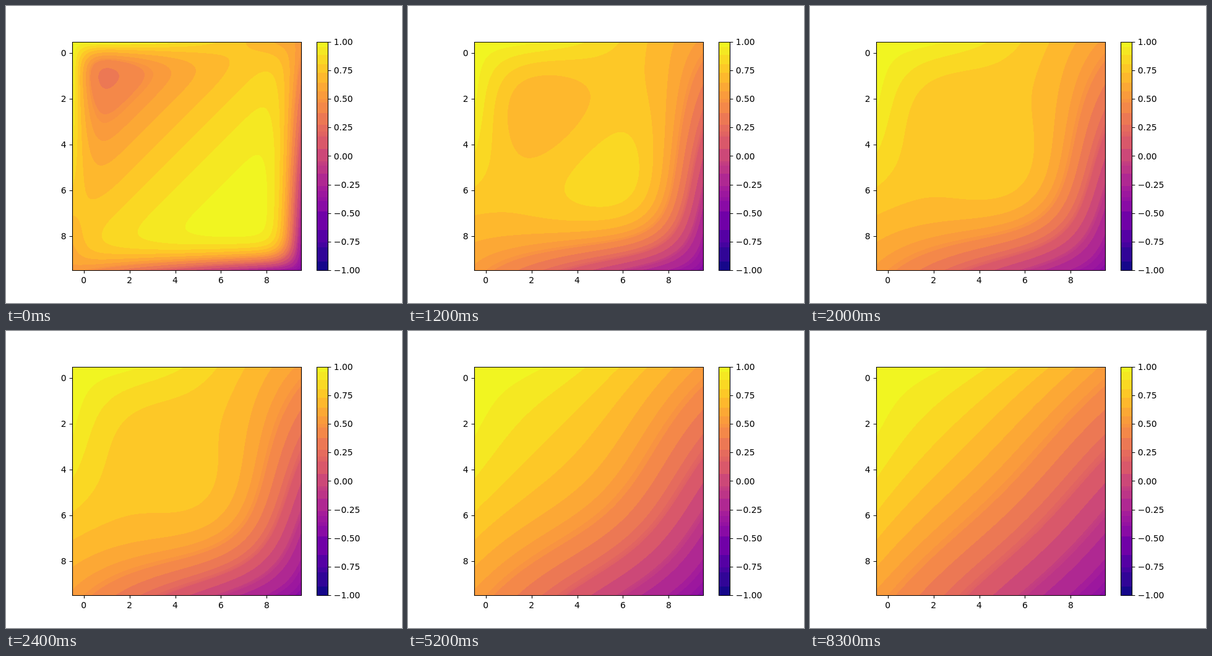
An HTML page with a canvas for the animation above (9 s loop, 640 px wide and 480 px high).

```html
<!DOCTYPE html>
<html lang="en">
<head>
<meta charset="utf-8">
<title>Heat diffusion on a square</title>
<style>
  html, body { margin: 0; width: 640px; height: 480px; overflow: hidden; background: #fff; }
  canvas, svg { position: absolute; left: 0; top: 0; display: block; }
  text { font: 13.889px "DejaVu Sans", Verdana, sans-serif; fill: #000; }
  path { fill: none; stroke: #000; stroke-width: 1.11; }
</style>
</head>
<body>
<canvas id="plot" width="640" height="480"></canvas>
<svg id="axes" width="640" height="480" viewBox="0 0 640 480"></svg>
<script>
const LOOP = 9000, STEP = 100;
const LEFT = 107.2, TOP = 57.6, SIZE = 369.6;   // plot square
const PX = 107, PY = 58, SIDE = 370;            // its pixels
const MODES = 28;
const T0 = 0.0025, DT = 0.0011;                 // diffusion time: first step, per step

// Steps at which the picture is renewed; between them it is held.
const steps = [];
for (let n = 0; n <= 33; n++) if (n !== 11) steps.push(n);
steps.push(37, 41, 46, 52, 60, 70, 83);

// ---- plasma colours, merged into coarse RGB cells ----
const stops = ['0d0887', '46039f', '7201a8', '9c179e', 'bd3786',
               'd8576b', 'ed7953', 'fb9f3a', 'fdca26', 'f0f921']
  .map(h => [0, 2, 4].map(i => parseInt(h.substr(i, 2), 16)));

function stopAt(i, c) {
  const last = stops.length - 1;
  if (i < 0) return 2 * stops[0][c] - stops[1][c];
  if (i > last) return 2 * stops[last][c] - stops[last - 1][c];
  return stops[i][c];
}

function plasma(k) {
  const p = k / 255 * (stops.length - 1);
  const i = Math.min(Math.floor(p), stops.length - 2), f = p - i;
  return [0, 1, 2].map(c => {
    const [a, b, d, e] = [-1, 0, 1, 2].map(j => stopAt(i + j, c));
    return b + f / 2 * (d - a + f * (2 * a - 5 * b + 4 * d - e + f * (3 * (b - d) + e - a)));
  });
}

function buildColours() {
  const cells = {}, keys = [];
  for (let k = 0; k < 256; k++) {
    const c = plasma(k), key = [c[0] >> 5, c[1] >> 4, c[2] >> 5].join();
    const cell = cells[key] || (cells[key] = { sum: [0, 0, 0], n: 0 });
    c.forEach((v, i) => cell.sum[i] += v);
    cell.n++;
    keys.push(key);
  }
  return keys.map(key => {
    const [r, g, b] = cells[key].sum.map(s => Math.round(s / cells[key].n));
    return (255 << 24 | b << 16 | g << 8 | r) >>> 0;
  });
}

const colours = Uint32Array.from(buildColours());
const colourOf = v => colours[Math.max(0, Math.min(255, Math.floor((v + 1) * 128)))];

// ---- heat equation: starts as sin(x+y), edges held at cos(x+y) ----
const S = [], C = [], waves = [];
for (let m = 1; m <= MODES; m++) {
  const k = m * Math.PI, sign = m % 2 ? -1 : 1, q = 2 * k / (k * k - 1);
  S.push(-sign * q * Math.sin(1));
  C.push(q * (1 - sign * Math.cos(1)));
  waves.push(Float64Array.from({ length: SIDE }, (_, i) => Math.sin(k * place(i))));
}

function place(i) {
  return Math.max(0, Math.min(1, (i + 0.4) / SIZE));
}

function amplitude(m, n, t) {
  const rate = Math.PI ** 2 * ((m + 1) ** 2 + (n + 1) ** 2), e = Math.exp(-rate * t);
  const cos = C[m] * C[n] - S[m] * S[n], sin = S[m] * C[n] + C[m] * S[n];
  return e * (sin - cos) - 2 * cos * (1 - e) / rate;
}

const ctx = document.getElementById('plot').getContext('2d');
const image = ctx.createImageData(SIDE, SIDE);
const pixels = new Uint32Array(image.data.buffer);
const row = new Float64Array(SIDE);

function drawField(t) {
  const amp = waves.map((_, m) => waves.map((_, n) => amplitude(m, n, t)));
  for (let j = 0; j < SIDE; j++) {
    const y = place(j);
    for (let i = 0; i < SIDE; i++) row[i] = Math.cos(place(i) + y);
    for (let m = 0; m < MODES; m++) {
      let a = 0;
      for (let n = 0; n < MODES; n++) a += amp[m][n] * waves[n][j];
      const w = waves[m];
      for (let i = 0; i < SIDE; i++) row[i] += a * w[i];
    }
    for (let i = 0; i < SIDE; i++) pixels[j * SIDE + i] = colourOf(row[i]);
  }
  ctx.putImageData(image, PX, PY);
}

function drawBar() {
  for (let y = PY; y < PY + SIDE; y++) {
    const c = colourOf(1 - 2 * (y + 0.5 - TOP) / SIZE);
    ctx.fillStyle = `rgb(${c & 255},${c >> 8 & 255},${c >> 16 & 255})`;
    ctx.fillRect(502, y, 18, 1);
  }
}

// ---- frames, ticks and labels ----
function drawAxes() {
  const snap = v => Math.round(v) + 0.5;
  let d = 'M107.5 58.5H477.5V427.5H107.5ZM502.5 58.5H520.5V427.5H502.5Z', labels = '';
  const label = (x, y, text, anchor) =>
    labels += `<text x="${x}" y="${y}" text-anchor="${anchor}">${text}</text>`;
  for (let k = 0; k < 10; k += 2) {
    const off = (k + 0.5) * SIZE / 10;
    d += `M${snap(LEFT + off)} 427.5v4.86M107.5 ${snap(TOP + off)}h-4.86`;
    label(LEFT + off, 448, k, 'middle');
    label(97.5, Math.round(TOP + off + 5.1), k, 'end');
  }
  for (let k = 0; k <= 8; k++) {
    const y = TOP + k * SIZE / 8;
    d += `M520.5 ${snap(y)}h4.86`;
    label(529.8, Math.round(y + 5.1), (1 - k / 4).toFixed(2).replace('-', '\u2212'), 'start');
  }
  document.getElementById('axes').innerHTML = `<path d="${d}"/>${labels}`;
}

// ---- clock ----
const start = performance.now();
let shown = -1;

function tick() {
  const now = (performance.now() - start) % LOOP / STEP;
  let step = 0;
  for (const s of steps) if (s <= now) step = s;
  if (step !== shown) drawField(T0 + DT * step);
  shown = step;
  requestAnimationFrame(tick);
}

drawBar();
drawAxes();
tick();
</script>
</body>
</html>
```
